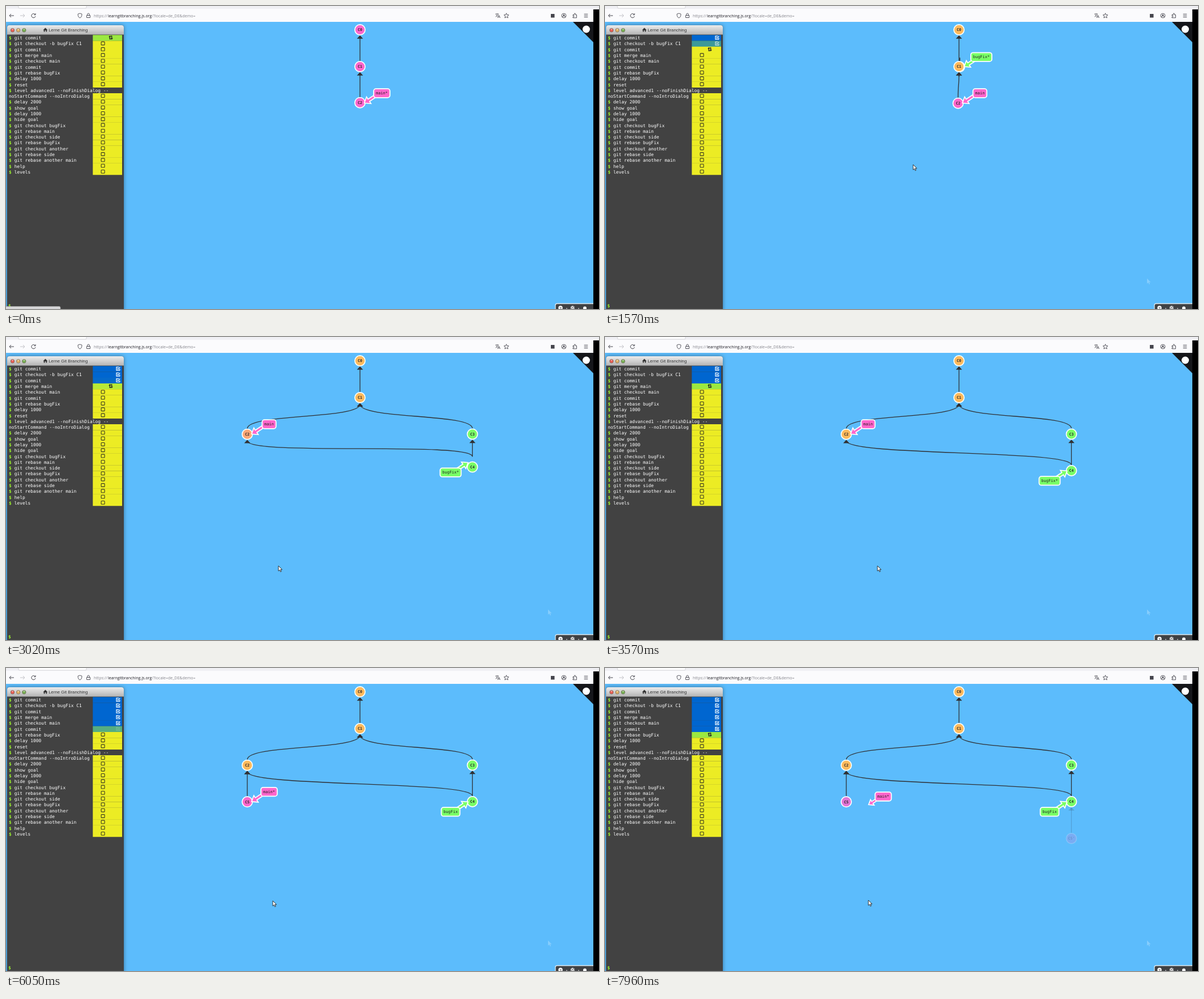
Animation, 1047 px wide and 535 px high, one loop 8 s. Source, as an HTML page with a canvas:

```html
<!DOCTYPE html>
<html lang="de">
<head>
<meta charset="utf-8">
<title>Lerne Git Branching</title>
<style>
html, body { margin: 0; width: 100%; height: 100%; overflow: hidden; background: #000; }
canvas { display: block; }
</style>
</head>
<body>
<canvas id="stage" width="1047" height="535"></canvas>
<script>
const g = document.getElementById('stage').getContext('2d');
const LOOP = 8000, MOVE = 400, BOUNCE = 800, FADE = 700;
const MONO = '"DejaVu Sans Mono", monospace', SANS = '"Liberation Sans", sans-serif';
const PINK = [255, 102, 204], ORANGE = [255, 186, 92], GREEN = [121, 255, 102], SKY = [92, 188, 252];
const YELLOW = [236, 236, 36], LIME = [155, 232, 64], BLUE = [0, 102, 208];
const INK = '#2f3033';

const COMMANDS = ['git commit', 'git checkout -b bugFix C1', 'git commit', 'git merge main',
  'git checkout main', 'git commit', 'git rebase bugFix', 'delay 1000', 'reset',
  'level advanced1 --noFinishDialog --|noStartCommand --noIntroDialog', 'delay 2000', 'show goal',
  'delay 1000', 'hide goal', 'git checkout bugFix', 'git rebase main', 'git checkout side',
  'git rebase bugFix', 'git checkout another', 'git rebase side', 'git rebase another main', 'help', 'levels'];
const STARTED = [-1600, 550, 1550, 2745, 4050, 4935, 6140];
const FINISHED = [35, 1145, 2345, 3580, 4535, 5735];
const REFRESH = 7890;

// time, x, y of the pointer tip
const POINTER = [[70, 957, 481], [500, 545, 261], [880, 545, 262], [1500, 544, 280], [1750, 544, 280],
  [2100, 480, 412], [2300, 481, 404], [5880, 481, 404], [6030, 471, 411], [6700, 471, 411], [7500, 465, 410]];

const clamp = v => Math.max(0, Math.min(1, v));
const lerp = (a, b, k) => a + (b - a) * k;
const mix = (a, b, k) => a.map((v, i) => lerp(v, b[i], k));
const rgb = c => `rgb(${c.map(Math.round)})`;
const ramp = (t, start, span = MOVE) => clamp((t - start) / span);
const ease = (t, start) => { const n = ramp(t, start); return n * n * (3 - 2 * n); };

function bounce(t, start) {
  const n = ramp(t, start, BOUNCE), p = 2.75, q = 7.5625;
  if (n < 1 / p) return q * n * n;
  if (n < 2 / p) return q * (n - 1.5 / p) ** 2 + .75;
  if (n < 2.5 / p) return q * (n - 2.25 / p) ** 2 + .9375;
  return n < 1 ? q * (n - 2.625 / p) ** 2 + .984375 : 1;
}

function rect(x, y, w, h, fill, r = 0, stroke, width = 1) {
  g.beginPath();
  g.roundRect(x, y, w, h, r);
  if (fill) { g.fillStyle = fill; g.fill(); }
  if (stroke) { g.strokeStyle = stroke; g.lineWidth = width; g.stroke(); }
}
function disc(x, y, r, fill, stroke, width) { rect(x - r, y - r, 2 * r, 2 * r, fill, r, stroke, width); }
function poly(points, fill, stroke, width = 1) {
  g.beginPath();
  points.forEach(p => g.lineTo(...p));
  if (fill) { g.closePath(); g.fillStyle = fill; g.fill(); }
  if (stroke) { g.strokeStyle = stroke; g.lineWidth = width; g.stroke(); }
}
function icon(path, x, y, stroke, width = 1, fill) {
  const shape = new Path2D(path);
  g.save();
  g.translate(x, y);
  if (fill) { g.fillStyle = fill; g.fill(shape); }
  if (stroke) { g.strokeStyle = stroke; g.lineWidth = width; g.stroke(shape); }
  g.restore();
}
function text(s, x, y, font, fill, align = 'left') {
  g.font = font;
  g.fillStyle = fill;
  g.textAlign = align;
  g.fillText(s, x, y);
}

function browser() {
  rect(0, 0, 1047, 535, '#000');
  rect(0, 0, 1047, 6, '#f0f0f4');
  rect(22, -6, 120, 10, '#fff', 2, '#c4c4ca', .7);
  rect(0, 5, 1037, 23, '#fbfbfd');
  const dark = '#45454d';
  icon('M4 0H-4M-1 -3L-4 0L-1 3', 10, 17, dark);
  icon('M-4 0H4M1 -3L4 0L1 3', 29, 17, '#c0c0c6');
  icon('M3 -2A3.6 3.6 0 1 0 3.6 1M3.6 -4V-1.4H1', 48.5, 17, dark);
  icon('M0 -4L3.5 -2.8C3.5 1 2.4 3 0 4C-2.4 3 -3.5 1 -3.5 -2.8Z', 130.5, 17, dark, .9);
  icon('M-3 -.5H3V3.5H-3ZM-1.8 -.5V-2.2A1.8 1.8 0 0 1 1.8 -2.2V-.5', 145.5, 17, dark, .9);
  const font = '7px "Open Sans", sans-serif';
  text('https://', 155, 19.7, font, '#85858c');
  text('learngitbranching.js.org', 180, 19.7, font, '#1c1b22');
  text('/?locale=de_DE&demo=', 257.5, 19.7, font, '#85858c');
  icon('M-4 -3H2M-1 -4V-3M-3.6 2C-1 1 .6 -1 .9 -3M-2.5 -2C-2 0 -.5 1 0 1.2M0 4L2.3 -1L4.5 4M.8 2.4H3.8', 868, 17, dark, .8);
  icon('M0 -4.3L1.3 -1.4L4.3 -1.2L2 .9L2.7 4L0 2.4L-2.7 4L-2 .9L-4.3 -1.2L-1.3 -1.4Z', 883.5, 17, dark, .9);
  rect(962, 14, 6.5, 6.5, dark);
  disc(985, 17, 3.9, null, dark, .9);
  disc(985, 16, 1.3, dark);
  icon('M-2.6 2A2.6 2 0 0 1 2.6 2', 985, 17.6, dark);
  icon('M-3.5 -1.5H-1.2V-3A1 1 0 0 1 1 -3V-1.5H3V3.8H-3.5V2H-2A1 1 0 0 0 -2 .2H-3.5Z', 1004.5, 17, dark, .9);
  icon('M-3.3 -2.7H3.3M-3.3 0H3.3M-3.3 2.7H3.3', 1024, 17, dark, .9);

  rect(0, 28, 1037, 507, rgb(SKY));
  poly([[1001, 28], [1037, 28], [1037, 64]], '#15161a');
  disc(1024.5, 41, 6.5, '#fff');
  rect(970, 525.5, 75, 20, '#3f4144', 3, '#dfe9f0', 1.3);
  rect(1037, 6, 10, 529, '#000');
  disc(979, 533, 3.7, '#fff');
  text('?', 979, 535.5, 'bold 6px ' + SANS, '#3f4144', 'center');
  disc(1000.5, 533, 3.5, '#fff');
  icon('M-2 -2L0 -1L-1 1H-3M1 -3L3 0L1 2', 1000.5, 533, '#3f4144');
  disc(1022, 533.5, 3, '#fff');
  disc(990, 534, .8, '#fff');
  disc(1011, 534, .8, '#fff');
}

function status(i, y, t) {
  const begun = t >= STARTED[i], done = t - FINISHED[i];
  let color = YELLOW;
  if (begun) color = mix(YELLOW, LIME, ramp(t, STARTED[i] + 20));
  if (done >= 0) color = mix(LIME, BLUE, clamp(done / FADE));
  rect(153.3, y - 5.2, 51.7, 10.4, rgb(color));
  if (done >= 0) {
    g.globalAlpha = clamp((done - 280) / 200);
    icon('M2.8 .2V3H-3V-2.8H1.4M-1.6 -.6L0 1L3.4 -2.8', 198, y - .5, '#fff', 1.2);
    g.globalAlpha = 1;
  } else if (begun) {
    icon('M.3 2.6H-1.7V-2M-.3 -2.6H1.7V2', 185, y - .6, '#222', 1.3);
    icon('M-3.9 -1L-1.7 -3.6L.4 -1ZM-.4 1L1.7 3.6L3.9 1Z', 185, y - .6, null, 1, '#222');
  } else {
    rect(168.1, y - 3.6, 6, 5.8, null, 1, '#3a3a20', 1.1);
  }
}

function terminal(t) {
  g.save();
  g.shadowColor = 'rgba(0,0,0,.4)';
  g.shadowBlur = 7;
  rect(2, 34, 206, 510, '#424242', 4);
  g.restore();
  const bar = g.createLinearGradient(0, 34, 0, 50.5);
  bar.addColorStop(0, '#ececec');
  bar.addColorStop(1, '#b4b4b4');
  rect(2, 34, 206, 16.5, bar, [4, 4, 0, 0]);
  ['#e8584e', '#e0b060', '#72ad4c'].forEach((c, i) => {
    disc(11.5 + i * 10.2, 42.8, 3.3, c, '#77706a', .8);
    disc(11.5 + i * 10.2, 41.4, 1.2, 'rgba(255,255,255,.5)');
  });
  icon('M-4 .4L0 -3.4L4 .4H2.8V3.4H.9V1H-.9V3.4H-2.8V.4Z', 69.5, 42, null, 1, '#333');
  text('Lerne Git Branching', 75.3, 45.2, '7.75px ' + SANS, '#333');

  const font = '7.92px ' + MONO;
  let row = 0;
  COMMANDS.forEach((command, i) => {
    command.split('|').forEach((line, part, all) => {
      const y = 56.4 + 10.29 * row++;
      if (part === all.length - 1) status(i, y, t);
      if (!part) text('$', 5, y + 2.8, 'bold ' + font, '#9cf52c');
      text(line, part ? 5 : 14.7, y + 2.8, font, '#fff');
    });
  });
  text('$', 4, 531.7, 'bold ' + font, '#9cf52c');
  if (t < 70) {
    rect(-2, 530.5, 98, 10, '#d6d6d8', 2, '#aaa', .7);
    text('https://learngitbranching', 5, 539.5, '7px ' + SANS, '#777');
  }
}

function edge(child, parent) {
  const [x, y] = child, [px, py] = parent, top = y - 10, end = py + 11.5;
  g.strokeStyle = g.fillStyle = INK;
  g.lineWidth = 1.3;
  g.beginPath();
  g.moveTo(x, top);
  g.bezierCurveTo(x, top - 27, px, end + 27, px, end);
  g.stroke();
  poly([[px, py + 9.8], [px + 5.4, py + 15.7], [px - 5.4, py + 15.7]], INK);
}

function node(name, [x, y], color) {
  disc(x, y, 9.1, rgb(color), '#fff', 1.7);
  text(name, x, y + 2.4, 'bold 6.6px ' + MONO, '#26262a', 'center');
}

// side runs from 1 (label right of the commit) to -1 (label left of it)
function branch(name, [x, y], side, chars, color) {
  const at = (dx, dy) => [x + dx * side, y + dy * side];
  const fill = rgb(color);
  poly([at(27.5, -16), at(14.2, -7.2), at(11.6, -11.2), at(7.6, -.4), at(19.4, .6),
    at(16.9, -3.2), at(30, -12)].concat([at(27.5, -16)]), fill, '#fff', 1.7);
  const [cx, cy] = at(38.5, -17.8), w = 4.2 * chars + 7.7;
  rect(cx - w / 2, cy - 7.7, w, 15.6, fill, 4, '#fff', 1.8);
  text(name, cx, cy + 2.2, '7px ' + MONO, '#202024', 'center');
}

function tree(t) {
  const [, checkout, commit3, merge, back, commit5] = STARTED;
  const c0 = [625, 42], c1 = [625, 107], c3 = [823.5, 171.5], c4 = [823.5, 236], c5 = [426, 236.3];
  const c2 = [lerp(625, 426, ease(t, commit3)), lerp(107, 171.7, bounce(t, -765))];
  const c2Edge = [c2[0], 171.7];
  const shared = mix(PINK, ORANGE, ease(t, checkout));
  const rebase = clamp((t - REFRESH) / 70) * .18;

  edge(c1, c0);
  edge(c2Edge, c1);
  if (t >= commit3) edge(mix(c1, c3, ease(t, commit3)), c1);
  if (t >= merge) {
    const tail = mix(c3, c4, ease(t, merge));
    edge(tail, c3);
    edge(tail, c2);
  }
  if (t >= commit5) edge(mix(c2, c5, ease(t, commit5)), c2);

  if (t >= commit5) node('C5', mix(c2, c5, bounce(t, commit5)), mix(PINK, SKY, rebase));
  if (t >= merge) node('C4', mix(c3, c4, bounce(t, merge)), GREEN);
  if (t >= commit3) node('C3', mix(c1, c3, bounce(t, commit3)), GREEN);
  node('C2', c2, mix(PINK, ORANGE, ease(t, merge)));
  node('C1', c1, shared);
  node('C0', c0, shared);

  if (rebase) {
    const copy = [823.5, 301];
    g.globalAlpha = rebase;
    edge(copy, c4);
    node("C5'", copy, PINK);
    g.globalAlpha = 1;
  }

  const flip = ease(t, REFRESH), star = ease(t, back);
  const mainAt = mix(mix(c2Edge, c5, ease(t, commit5)), [823.5, 301], flip);
  const mainActive = t < checkout || t >= back;
  branch(mainActive ? 'main*' : 'main', mainAt, 1 - 2 * flip, 5 - ease(t, checkout) + star, PINK);
  if (t >= checkout) {
    const out = ease(t, commit3);
    const fixAt = mix(mix(c1, c3, out), c4, ease(t, merge));
    g.globalAlpha = ease(t, checkout);
    branch(t < back ? 'bugFix*' : 'bugFix', fixAt, 1 - 2 * out, 7 - star, GREEN);
    g.globalAlpha = 1;
  }
}

function pointer(t) {
  if (t < POINTER[0][0]) return;
  const arrow = 'M0 0V9.2L2.2 7.3L3.7 10.6L5.2 9.9L3.7 6.7H6.6Z';
  if (t > 150) {
    g.globalAlpha = .25;
    icon(arrow, 957, 481, null, 1, '#fff');
    g.globalAlpha = 1;
  }
  const next = POINTER.findIndex(p => p[0] > t);
  const b = POINTER.at(next), a = next < 0 ? b : POINTER[next - 1];
  const k = next < 0 ? 1 : (t - a[0]) / (b[0] - a[0]);
  icon(arrow, lerp(a[1], b[1], k), lerp(a[2], b[2], k), '#222', .9, '#fff');
}

function draw(now) {
  const t = now % LOOP;
  browser();
  terminal(t);
  tree(t);
  pointer(t);
  requestAnimationFrame(draw);
}
draw(0);
</script>
</body>
</html>
```
